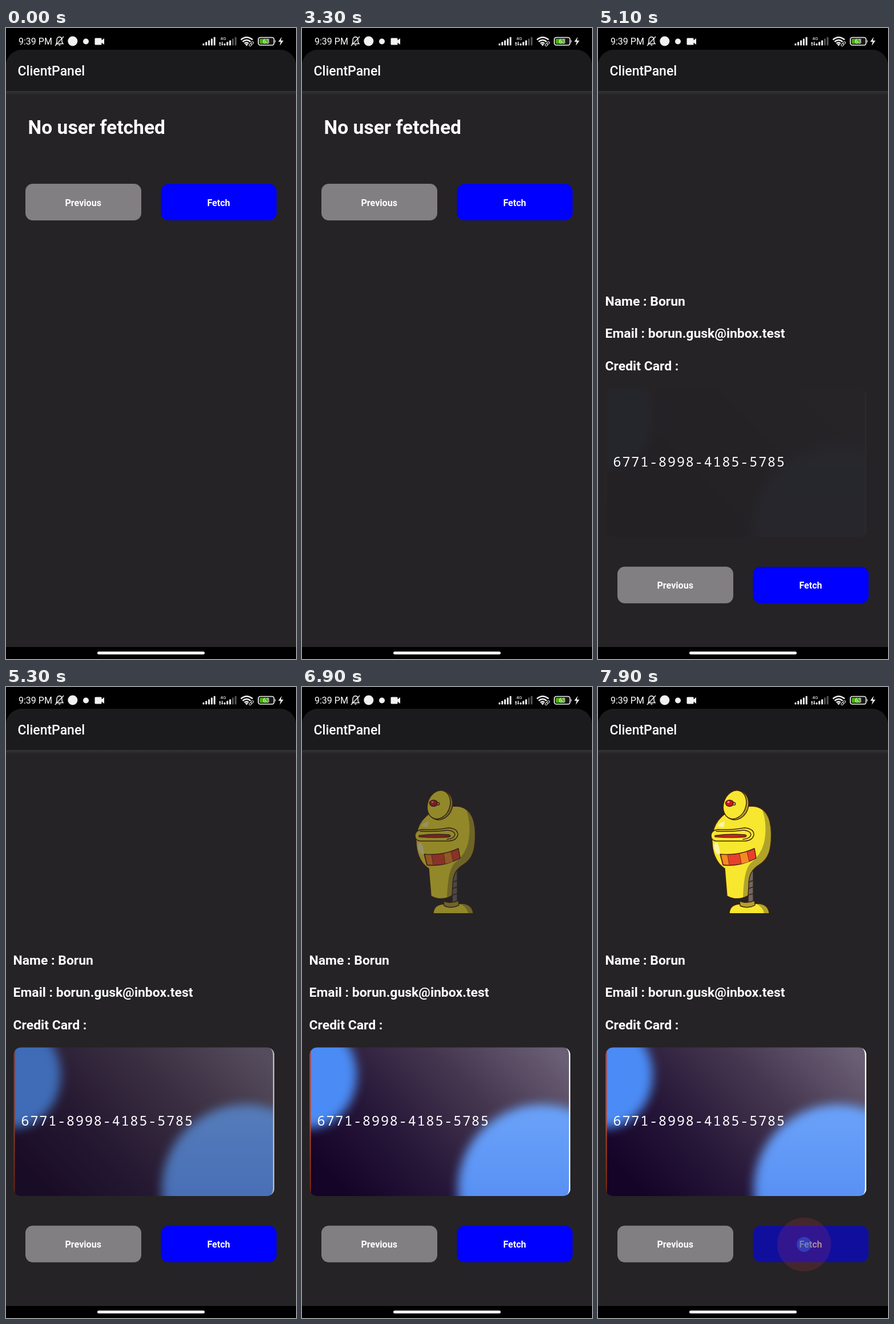
These frames come from a looping animation (508 px wide and 1102 px high, 8 s). An HTML page:

```html
<!DOCTYPE html>
<html lang="en">
<head>
<meta charset="utf-8">
<title>Client panel</title>
<style>
  html, body { margin: 0; width: 100%; height: 100%; overflow: hidden; background: #000; }
  svg { display: block; width: 100vw; height: 100vh; }
  text { font-family: Roboto, sans-serif; fill: #fff; white-space: pre; }
  .label { font-size: 22.95px; font-weight: 700; }
  .btn { font-size: 16.1px; font-weight: 700; text-anchor: middle; }
  .ink { stroke: #45200f; stroke-width: 1.4; stroke-linejoin: round; stroke-linecap: round; }
</style>
</head>
<body>
<svg viewBox="0 0 508 1102" xmlns="http://www.w3.org/2000/svg">
  <defs>
    <linearGradient id="edge" x1="0" y1="0" x2="0" y2="1">
      <stop offset="0" stop-color="#353335"/><stop offset="1" stop-color="#252325"/>
    </linearGradient>
    <linearGradient id="night" gradientUnits="userSpaceOnUse" x1="90" y1="900" x2="400" y2="590">
      <stop offset="0" stop-color="#150328"/><stop offset=".3" stop-color="#261638"/>
      <stop offset=".65" stop-color="#45364f"/><stop offset="1" stop-color="#6a5f75"/>
    </linearGradient>
    <linearGradient id="sky" x1="0" y1="0" x2="0" y2="1">
      <stop offset="0" stop-color="#6ba3fa"/><stop offset=".6" stop-color="#568ff3"/>
    </linearGradient>
    <linearGradient id="rim" x1="0" y1="0" x2="0" y2="1">
      <stop offset="0" stop-color="#a8443c"/><stop offset=".5" stop-color="#b8492c"/>
      <stop offset="1" stop-color="#7c2408"/>
    </linearGradient>
    <filter id="soft" x="-30%" y="-30%" width="160%" height="160%" color-interpolation-filters="sRGB">
      <feGaussianBlur stdDeviation="9"/>
    </filter>
    <clipPath id="cardClip"><rect x="13.5" y="629.5" width="456.5" height="259.5" rx="12.900"/></clipPath>
    <path id="head" d="M217 226C234 210 252 208 270 208C292 209 303 226 303.500 255C304 284 299 300 283 310C270 318 264 328 264 345L263 364Q245 375 226 365L222 317C207 308 199 288 200 264C201 246 207 235 217 226Z"/>
    <clipPath id="headClip"><use href="#head"/></clipPath>
  </defs>

  <rect width="508" height="1102" fill="#000"/>
  <path d="M0 1081V66A28 28 0 0 1 28 38H480A28 28 0 0 1 508 66V1081Z" fill="#252325"/>
  <path d="M0 110V66A28 28 0 0 1 28 38H480A28 28 0 0 1 508 66V110Z" fill="#1b1a1c"/>
  <rect y="110" width="508" height="7" fill="url(#edge)"/>
  <text x="20.500" y="83" font-size="23" font-weight="500">ClientPanel</text>
  <rect x="160" y="1089" width="188" height="5" rx="2.500" fill="#fff"/>

  <!-- status bar -->
  <g fill="#f2f2f2">
    <text x="22" y="29" font-size="16">9:39 PM</text>
    <g fill="none" stroke="#f2f2f2" stroke-width="1.500">
      <path d="M88 27.500H100L98 24.500V20.500Q98 16 93.500 15.500Q89.500 16 89 20.500V24.500Z"/>
      <path d="M86 31L101 15"/>
    </g>
    <path d="M91.500 29H96Q94 32.500 91.500 29Z"/>
    <circle cx="116.800" cy="23" r="8.500"/>
    <circle cx="140" cy="23.500" r="5"/>
    <path d="M157 17.500H166Q167.500 17.500 167.500 19V21.500L172 18V29L167.500 25.500V28Q167.500 29.500 166 29.500H157Q155.500 29.500 155.500 28V19Q155.500 17.500 157 17.500Z"/>
    <g id="bars"></g>
    <text x="375.500" y="21" font-size="8">4G</text>
    <path d="M373 27L374.800 24L376.600 27H375.500V31H374.100V27ZM376.900 28L378.700 31L380.500 28H379.400V24H378V28Z"/>
    <g fill="none" stroke="#f2f2f2" stroke-width="2.400">
      <path d="M411.500 20.500Q421.500 12 432 20.500"/>
      <path d="M414.500 24Q421.500 18 428.500 24"/>
      <path d="M417.500 27Q421.500 24 425 27" stroke-width="2.200"/>
    </g>
    <path d="M418.800 28.500Q421.500 26.500 424.200 28.500L421.500 31.500Z"/>
    <g fill="none" stroke="#d0d0d0" stroke-width="1.200">
      <rect x="-3" y="-1.700" width="5" height="3.400" rx="1.700" transform="translate(428.500 29) rotate(-45)"/>
      <rect x="-2" y="-1.700" width="5" height="3.400" rx="1.700" transform="translate(431 26.500) rotate(-45)"/>
    </g>
    <rect x="442" y="16.500" width="27.500" height="13.500" rx="3.500" fill="#171717" stroke="#f2f2f2" stroke-width="1.700"/>
    <rect x="444.500" y="19" width="15" height="8.500" rx="1" fill="#49b011"/>
    <path d="M471 20.500Q473.500 23 471 26Z"/>
    <text x="455.800" y="27" font-size="10.500" text-anchor="middle">63</text>
    <path d="M483 15.500L477 24H481L479.500 31L486 22H481.500Z"/>
  </g>

  <text id="empty" x="38.500" y="185" font-size="33.600" font-weight="700">No user fetched</text>

  <g id="user">
    <text class="label" x="12.600" y="484.500">Name : Borun</text>
    <text class="label" x="12.600" y="541">Email : borun.gusk@inbox.test</text>
    <text class="label" x="12.600" y="597.500">Credit Card :</text>

    <g id="card" clip-path="url(#cardClip)">
      <rect x="13" y="629" width="458" height="261" fill="url(#night)"/>
      <ellipse cx="14" cy="678" rx="82" ry="92" fill="#4b8bf5" filter="url(#soft)"/>
      <circle cx="420" cy="876" r="147" fill="url(#sky)" filter="url(#soft)"/>
      <rect x="13" y="629" width="2.600" height="261" fill="url(#rim)"/>
      <path d="M471 629V890H461Q467.700 886 467.700 875V644Q467.700 633 461 629Z" fill="#fff"/>
    </g>
    <text x="26.500" y="766" style="font:23.3px 'Noto Sans Mono',monospace;letter-spacing:1.94px">6771-8998-4185-5785</text>

    <g id="robot">
      <path class="ink" d="M264 329Q267 321 272 317L272 376H263Z" fill="#6b6968"/>
      <path class="ink" d="M264 341L271 338M264 352L272 349M264 363L272 361" fill="none"/>
      <path d="M230 395Q231 378 252 379L280 378Q298 379 300 395Z" fill="#f7e72f"/>
      <path d="M276 378Q298 379 300 395H291Q289 384 276 378Z" fill="#b0a32a"/>
      <path class="ink" d="M230 395Q231 378 252 379L280 378Q298 379 300 395" fill="none"/>
      <path class="ink" d="M248 374Q261 379 274 373L275 381Q262 388 249 382Z" fill="#b0a32a"/>
      <g clip-path="url(#headClip)">
        <rect x="195" y="205" width="112" height="172" fill="#f7e72f"/>
        <path d="M285 207Q298 237 291 272Q285 294 268 307Q255 318 254 370L310 375V207Z" fill="#b0a32a"/>
        <path d="M203 281Q203 269 209 272Q213 279 214 293Q207 294 203 281Z" fill="#fbf5a8"/>
        <path d="M209 243Q213 236 222 235L220 245Z" fill="#fbf5a8"/>
      </g>
      <use class="ink" href="#head" fill="none"/>
      <path class="ink" d="M214 292Q246 295 274 282L277 299Q250 314 219 311Z" fill="#e8402c"/>
      <path d="M216 293L227 293.500L230 310.500L220 310ZM248 291.500L261 288L265 305L251 309Z" fill="#f58a22"/>
      <path d="M227 293.500L230 311M248 291.500L251 309M261 288L265 305" fill="none" stroke="#7a3413"/>
      <path class="ink" d="M210 249Q235 250 256 246Q273 247 273 258Q271 268 257 269H207Q198 268 198 259Q199 250 210 249Z" fill="#f7e72f"/>
      <path class="ink" d="M207 252Q235 253 255 250Q267 251 268 258Q266 265 254 266" fill="none" stroke-width="1"/>
      <path class="ink" d="M205 259.500Q231 256 257 258Q263 260 257 262Q231 264 205 261.500Z" fill="#d3261d"/>
      <g class="ink" transform="rotate(20 241 206)">
        <ellipse cx="242" cy="206" rx="21.500" ry="26" fill="#b0a32a"/>
        <ellipse cx="239.500" cy="206" rx="19.500" ry="25.500" fill="#f7e72f"/>
      </g>
      <ellipse class="ink" cx="230.500" cy="203" rx="7" ry="5.500" fill="#d8131b" stroke-width="1"/>
      <ellipse cx="228.500" cy="201" rx="2.200" ry="1.400" fill="#f99"/>
      <circle class="ink" cx="238.500" cy="204" r="2.200" fill="#ddd0a0" stroke-width="1"/>
    </g>
  </g>

  <g id="buttons">
    <rect x="34" y="272" width="203" height="64" rx="12.900" fill="#827f82"/>
    <text class="btn" x="135.200" y="310.500">Previous</text>
    <g id="fetch">
      <rect x="271.500" y="272.300" width="202.500" height="63.500" rx="12.900" fill="#00f"/>
      <text class="btn" x="372.500" y="310.500">Fetch</text>
    </g>
  </g>

  <g id="touch">
    <circle cx="361" cy="973.500" r="47" fill="#d83c4c" fill-opacity=".17"/>
    <circle cx="361" cy="973.500" r="13" fill="#3a6ae0" fill-opacity=".45"/>
  </g>
</svg>
<script>
  const LOOP = 8000, STEP = 100;
  const LOADED = 5050, CARD_IN = 5090, ROBOT_IN = 6745, FADE = 300;
  const TOUCH = 7800, PRESS = 7820, PRESS_FADE = 150;
  const $ = id => document.getElementById(id);
  const progress = (t, start, length) => Math.min(1, Math.max(0, (t - start) / length));
  const ease = p => p < .5 ? 2 * p * p : 1 - 2 * (1 - p) * (1 - p);
  const show = (id, on) => $(id).setAttribute('visibility', on ? 'visible' : 'hidden');
  const fade = (id, value) => $(id).setAttribute('opacity', value);

  // signal strength: five bars per card
  function signal(x, lit) {
    let out = '';
    for (let i = 0; i < 5; i++) {
      const h = 3.5 + i * 2.8;
      out += `<rect x="${x + i * 4.8}" y="${30.5 - h}" width="3" height="${h}" rx="1" fill="${i < lit ? '#f2f2f2' : '#555'}"/>`;
    }
    return out;
  }
  $('bars').innerHTML = signal(344.5, 5) + signal(381.5, 3);

  function render(t) {
    const loaded = t >= LOADED;
    show('empty', !loaded);
    show('user', loaded);
    show('touch', t >= TOUCH);
    $('buttons').setAttribute('transform', `translate(0 ${loaded ? 668.7 : 0})`);
    fade('card', progress(t, CARD_IN, FADE));
    fade('robot', progress(t, ROBOT_IN, FADE));
    fade('fetch', 1 - .8 * ease(progress(t, PRESS, PRESS_FADE)));
  }

  const begin = performance.now();
  function tick() {
    const t = (performance.now() - begin) % LOOP;
    render(Math.floor(t / STEP) * STEP);
    requestAnimationFrame(tick);
  }
  render(0);
  requestAnimationFrame(tick);
</script>
</body>
</html>
```
